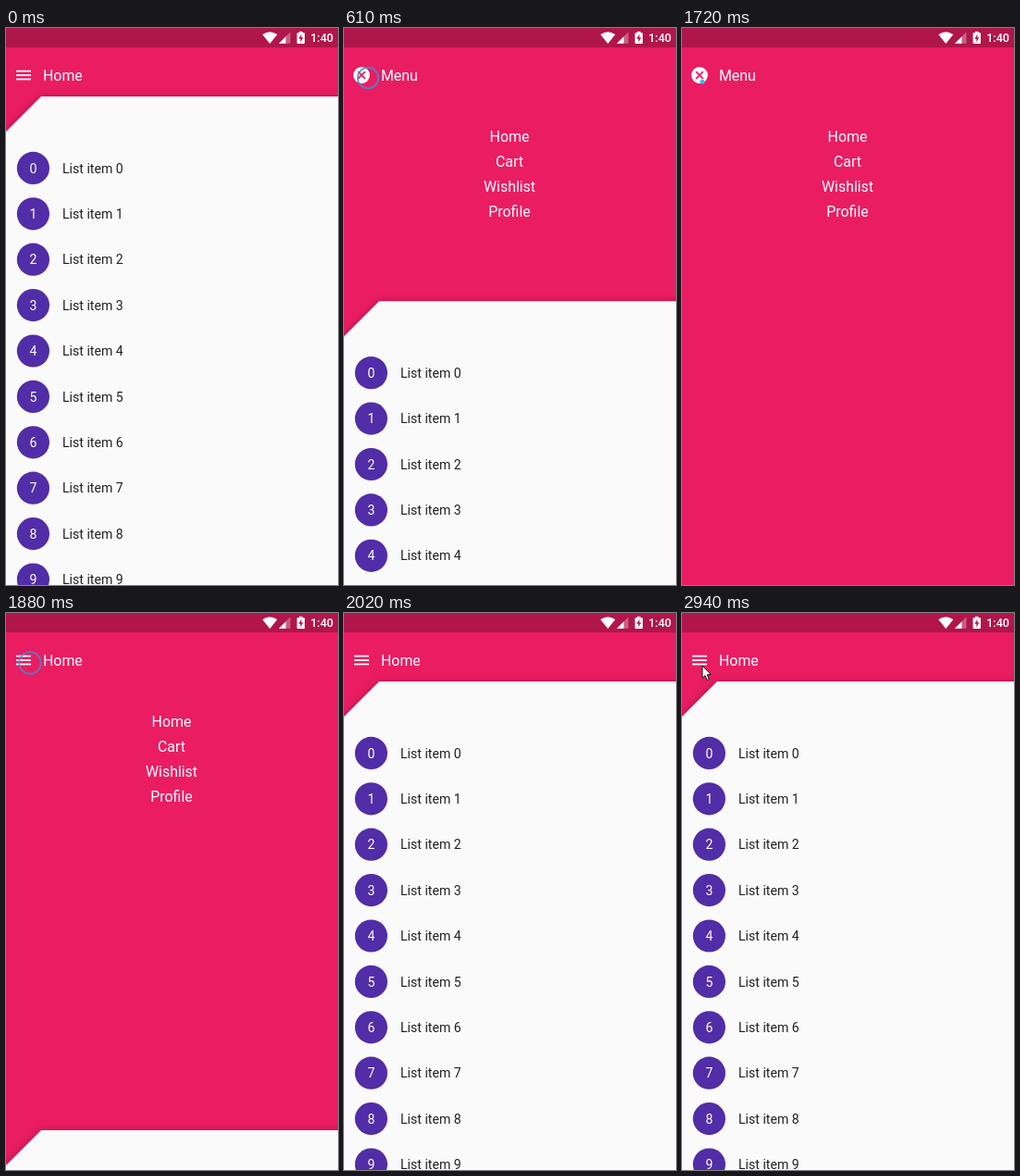
These frames come from a looping animation (359 px wide and 602 px high, 3040 ms). An HTML page with a canvas:

```html
<!DOCTYPE html>
<html lang="en">
<head>
<meta charset="utf-8">
<title>Backdrop menu</title>
<style>
  html, body { margin: 0; width: 100%; height: 100%; overflow: hidden; background: #e91e63; }
  canvas { display: block; width: 359px; height: 602px; }
</style>
</head>
<body>
<canvas id="stage"></canvas>
<script>
const W = 359, H = 602, LOOP = 3040;
const PINK = '#ea1c62', DARK = '#b0164a', PURPLE = '#512da8', CYAN = '#1fd0d6';
const CLOSED = 74, OPEN = 602, CUT = 38, ROW = 49.4;
const OPEN_STEPS = [460, 510, 560, 610, 660, 700];
const CLOSE_STEPS = [1720, 1780, 1830, 1880, 1930, 1980, 2020];

const canvas = document.getElementById('stage');
const ctx = canvas.getContext('2d');
const dpr = window.devicePixelRatio || 1;
canvas.width = W * dpr;
canvas.height = H * dpr;

function text(str, x, y, size, color, align = 'left', weight = 400) {
  ctx.font = `${weight} ${size}px Roboto, sans-serif`;
  ctx.textAlign = align;
  ctx.fillStyle = color;
  ctx.fillText(str, x, y);
}

function disc(x, y, r, fill, stroke, width = 1) {
  ctx.beginPath();
  ctx.arc(x, y, r, 0, Math.PI * 2);
  if (fill) { ctx.fillStyle = fill; ctx.fill(); }
  if (stroke) { ctx.strokeStyle = stroke; ctx.lineWidth = width; ctx.stroke(); }
}

function poly(points, fill) {
  ctx.beginPath();
  points.forEach(([x, y]) => ctx.lineTo(x, y));
  ctx.closePath();
  ctx.fillStyle = fill;
  ctx.fill();
}

function line(x1, y1, x2, y2, color, width) {
  ctx.beginPath();
  ctx.moveTo(x1, y1);
  ctx.lineTo(x2, y2);
  ctx.strokeStyle = color;
  ctx.lineWidth = width;
  ctx.stroke();
}

// Critically damped spring from 0 to 1
function spring(ms) {
  if (ms <= 0) return 0;
  const t = ms / 1000;
  return Math.min(1, 1.01 - (1.01 + 21.58 * t) * Math.exp(-22.36 * t));
}

// Hold time at the last step reached
function snap(t, steps) {
  return steps.reduce((held, s) => (t >= s ? s : held), steps[0]);
}

function menuState(t) {
  if (t < 460 || t >= 2020) return { open: 0, menu: false };
  if (t < 700) {
    const open = spring(snap(t, OPEN_STEPS) - 548.5);
    return { open, menu: open > 0 };
  }
  if (t < 1720) return { open: 1, menu: true };
  const closed = spring(snap(t, CLOSE_STEPS) - 1861);
  return { open: 1 - closed, menu: closed === 0 };
}

function statusBar() {
  ctx.fillStyle = DARK;
  ctx.fillRect(0, 0, W, 21);
  ctx.beginPath();
  ctx.moveTo(285.3, 17);
  ctx.lineTo(277.3, 7);
  ctx.quadraticCurveTo(285.3, 1.3, 293.3, 7);
  ctx.closePath();
  ctx.fillStyle = '#fff';
  ctx.fill();
  poly([[295, 16.8], [307.5, 16.8], [307.5, 4.3]], 'rgba(255,255,255,.32)');
  poly([[295, 16.8], [302.5, 16.8], [302.5, 9.3]], '#fff');
  ctx.fillStyle = '#fff';
  ctx.fillRect(317, 3.8, 3.6, 2);
  ctx.beginPath();
  ctx.roundRect(314.6, 5, 8.4, 12, 1);
  ctx.fill();
  poly([[319.4, 6.6], [316.4, 11.7], [318.4, 11.7], [318.4, 15.4], [321.3, 10.3], [319.4, 10.3]], DARK);
  text('1:40', 354, 15.4, 12.6, '#fff', 'right', 500);
}

function header(menu) {
  if (menu) {
    disc(19, 51, 8.9, '#fff');
    line(15.2, 47.2, 22.8, 54.8, PINK, 1.8);
    line(22.8, 47.2, 15.2, 54.8, PINK, 1.8);
  } else {
    for (let i = -1; i <= 1; i++) line(11, 51 + i * 4.41, 27, 51 + i * 4.41, '#fff', 1.8);
  }
  text(menu ? 'Menu' : 'Home', 40, 56.5, 15.9, '#fff');
}

function links() {
  ['Home', 'Cart', 'Wishlist', 'Profile'].forEach((name, i) =>
    text(name, 179, 122.6 + i * 27.2, 15.9, '#fff', 'center'));
}

function panel(top) {
  ctx.save();
  ctx.shadowColor = 'rgba(0,0,0,.36)';
  ctx.shadowBlur = 10 * dpr;
  ctx.shadowOffsetY = 2 * dpr;
  poly([[CUT, top], [W + 20, top], [W + 20, H + 60], [0, H + 60], [0, top + CUT]], '#fafafa');
  ctx.restore();
  for (let i = 0; i < 10; i++) {
    const y = top + 77.4 + i * ROW;
    disc(29.4, y, 17.6, PURPLE);
    text(i, 29.4, y + 5.1, 14.1, '#fff', 'center');
    text('List item ' + i, 61, y + 5.1, 14.1, 'rgba(0,0,0,.87)');
  }
}

function ripple(t) {
  const steps = t < 700 ? OPEN_STEPS : CLOSE_STEPS;
  const age = snap(t, steps) - steps[0];
  if (t < steps[0] || age >= 210) return;
  if (age === 0) {
    disc(22, 58, 2.6, '#35bfe0');
    return;
  }
  const k = age / 150;
  ctx.globalAlpha = Math.min(1, 1.75 - k * 0.95);
  disc(22 + 4 * Math.min(k, 1), 57 - 3 * Math.min(k, 1), 2.5 + 8.7 * k, null, '#3f8fd2', 2);
  ctx.globalAlpha = 1;
}

function pointer() {
  ctx.beginPath();
  [[22, 57], [22, 70.5], [25, 67.6], [27.2, 72.6], [29.4, 71.6], [27.2, 66.8], [31.2, 66.4]]
    .forEach(([x, y]) => ctx.lineTo(x, y));
  ctx.closePath();
  ctx.fillStyle = '#fff';
  ctx.fill();
  ctx.strokeStyle = '#111';
  ctx.lineWidth = 1;
  ctx.stroke();
}

function gesturePath(alpha) {
  ctx.save();
  ctx.globalAlpha = alpha;
  ctx.setLineDash([3, 1]);
  line(34, 78, 167.5, 303, CYAN, 1.1);
  line(190.5, 342, 324, 567, CYAN, 1.1);
  ctx.setLineDash([5, 3]);
  disc(179, 322, 20, 'rgba(255,255,255,.6)', '#c3bfd6', 1.1);
  ctx.setLineDash([]);
  disc(179, 322, 9.3, '#28d5d5', '#14373c', 1.4);

  disc(22, 58, 20.6, null, 'rgba(255,255,255,.55)', 2);
  disc(22, 58, 19.5, 'rgba(160,150,170,.48)', '#2b2028', 1.4);

  const glow = ctx.createRadialGradient(336, 586, 2, 336, 586, 19);
  glow.addColorStop(0, '#f6f4fb');
  glow.addColorStop(1, '#cfc8e2');
  disc(336, 586, 19.2, glow, '#15282e', 1.5);
  ctx.setLineDash([3, 5]);
  disc(336, 586, 19.6, null, CYAN, 0.8);
  ctx.restore();
}

function draw(t) {
  const { open, menu } = menuState(t);
  ctx.setTransform(dpr, 0, 0, dpr, 0, 0);
  ctx.fillStyle = PINK;
  ctx.fillRect(0, 0, W, H);
  links();
  if (open < 1) panel(CLOSED + (OPEN - CLOSED) * open);
  statusBar();
  header(menu);
  ripple(t);
  if (t >= 2320) {
    if (t < 2940) gesturePath(t < 2360 ? 0.5 : 1);
    pointer();
  }
}

const start = performance.now();
function tick() {
  draw((performance.now() - start) % LOOP);
  requestAnimationFrame(tick);
}
tick();
</script>
</body>
</html>
```
